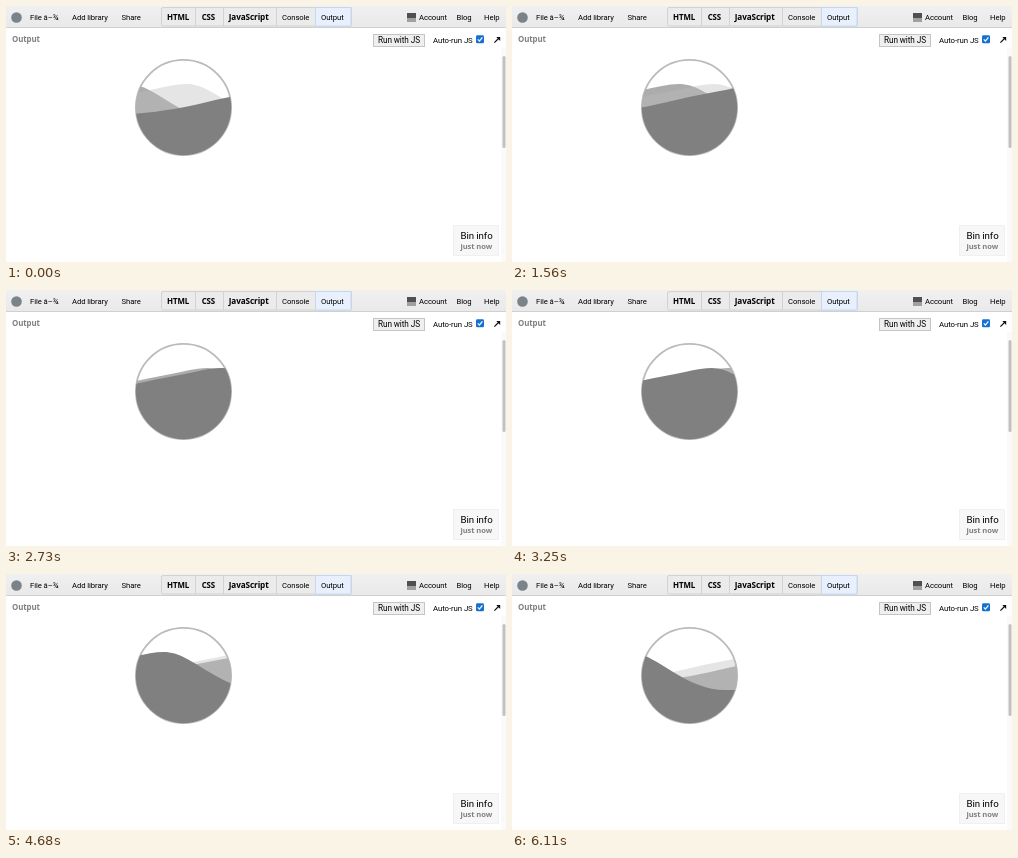
An HTML page for the animation above (6.24 s loop, 500 by 256 pixels).

```html
<!DOCTYPE html>
<html lang="en">
<head>
<meta charset="utf-8">
<title>Waves in a circle</title>
<style>
html, body { margin: 0; width: 100%; height: 100%; overflow: hidden; background: #fff; }
svg { display: block; width: 500px; height: 256px; }
text { font: 7.7px Roboto, "Open Sans", sans-serif; letter-spacing: -.08px; fill: #000; white-space: pre; }
.bold { font: 700 7.9px "Open Sans", "Noto Sans", sans-serif; letter-spacing: -.1px; }
.grey { fill: #808080; }
</style>
</head>
<body>
<svg viewBox="0 0 500 256">
  <defs>
    <linearGradient id="bar" x2="0" y2="1">
      <stop stop-color="#f0f0f0"/><stop offset="1" stop-color="#e9e9e9"/>
    </linearGradient>
    <clipPath id="bowl"><circle cx="177.5" cy="101.5" r="47.7"/></clipPath>
    <path id="wave" d="M-190 109C-150 108-118 101.5-98 96.9C-80 92.7-62 89-44 85.6C-26 82.2-12 78 0 78C16 78 27 87 50 100.5C64 108.7 80 116 97 116H150V160H-190Z"/>
  </defs>
  <rect width="500" height="256" fill="#fff"/>

  <!-- toolbar -->
  <rect width="500" height="22" fill="url(#bar)"/>
  <path d="M0 21.5H500" stroke="#d0d0d0"/>
  <circle cx="10.5" cy="11.5" r="5.3" fill="#7b838a"/>
  <rect x="155.5" y="1.5" width="190" height="18.5" rx="1.5" fill="#ebebeb" stroke="#d2d2d2"/>
  <path d="M189.5 2V20M217.5 2V20M270.5 2V20" stroke="#d2d2d2"/>
  <rect x="309.5" y="1.5" width="35.5" height="18.5" fill="#e7f0fc" stroke="#c6d8ee"/>
  <rect x="401" y="7" width="9" height="9" fill="#a0a0a0"/>
  <rect x="401" y="7" width="9" height="5" fill="#505050"/>

  <!-- output panel -->
  <rect x="367.5" y="28.5" width="51" height="12" fill="#efefef" stroke="#c4c4c4"/>
  <rect x="470" y="29.3" width="8" height="8" rx="1.3" fill="#1670d2"/>
  <path d="M471.8 33.4L473.4 35.1L476.4 31.3" fill="none" stroke="#fff" stroke-width="1.2"/>
  <path d="M488.4 36.6L493 32" stroke="#111" stroke-width="1.2"/>
  <path d="M490.3 31H494.2V34.9Z" fill="#111"/>
  <rect x="495" y="42" width="5" height="214" fill="#fafafa"/>
  <rect x="496.5" y="50" width="3" height="92" rx="1.5" fill="#c1c1c1"/>
  <rect x="447.5" y="219.5" width="45" height="30" fill="#f7f7f7" stroke="#f0f0f0"/>
  <g id="labels"></g>

  <!-- bowl -->
  <circle cx="177.5" cy="101.5" r="47.6" fill="none" stroke="#bbb" stroke-width="1.8"/>
  <g clip-path="url(#bowl)">
    <use id="mid" href="#wave" fill="#acacac"/>
    <use id="light" href="#wave" fill="#bbb" fill-opacity=".386"/>
    <use id="dark" href="#wave" fill="#808080"/>
  </g>
</svg>
<script>
const LOOP = 6240, STEP = 130;

// text, x, baseline, class, font size
const labels = [
  ["File â–¾", 24, 14.2],
  ["Add library", 66, 14.2],
  ["Share", 115.5, 14.2],
  ["HTML", 161, 14.2, "bold"],
  ["CSS", 195.7, 14.2, "bold"],
  ["JavaScript", 222.7, 14.2, "bold", 8.2],
  ["Console", 276, 14.2],
  ["Output", 315, 14.2],
  ["Account", 413, 14.2],
  ["Blog", 450.5, 14.2],
  ["Help", 478, 14.2],
  ["Output", 6, 36.3, "bold grey"],
  ["Run with JS", 372, 37.2, "", 8.2],
  ["Auto-run JS", 427, 36.8, "", 7.8],
  ["Bin info", 454.5, 233, "", 9.7],
  ["just now", 454.5, 243.2, "bold grey", 7.6]
];
const group = document.getElementById("labels");
for (const [text, x, y, cls = "", size] of labels) {
  const el = document.createElementNS("http://www.w3.org/2000/svg", "text");
  el.setAttribute("x", x);
  el.setAttribute("y", y);
  el.setAttribute("class", cls);
  if (size) el.style.fontSize = size + "px";
  el.textContent = text;
  group.append(el);
}

// crest position at the loop start and its speed in px per ms
const waves = [
  ["mid", 121, .0294],
  ["light", 180, .0137],
  ["dark", 295, -.0294]
].map(([id, x, speed]) => ({ el: document.getElementById(id), x, speed }));

const start = performance.now();
function draw(now) {
  const t = Math.floor(Math.max(0, now - start) % LOOP / STEP) * STEP;
  for (const { el, x, speed } of waves)
    el.setAttribute("transform", `translate(${x + speed * t} 0)`);
  requestAnimationFrame(draw);
}
draw(start);
</script>
</body>
</html>
```
